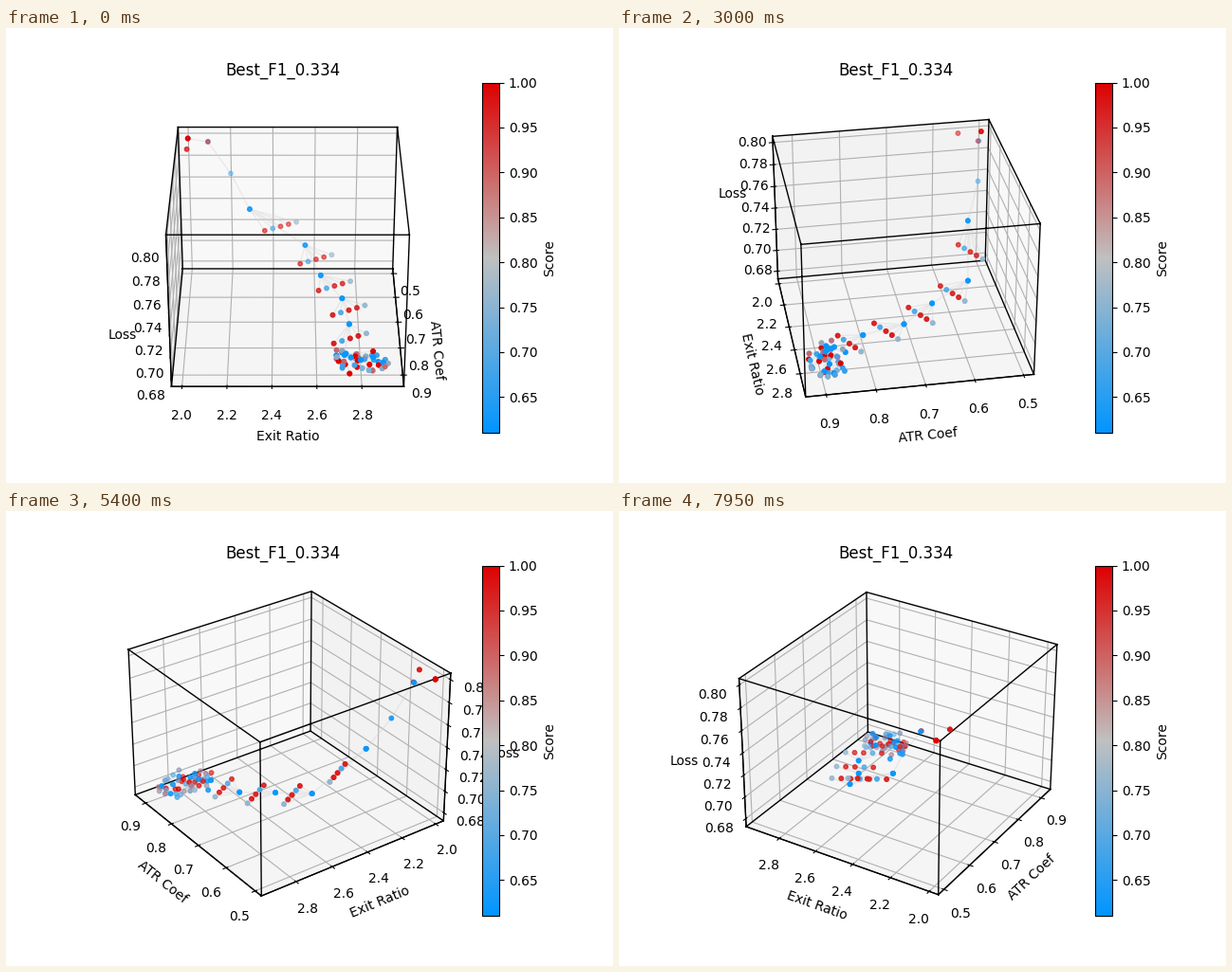
These frames come from a looping animation (640 by 480 pixels, 8000 ms). A matplotlib script:

```python
from itertools import combinations, cycle, product

import matplotlib.pyplot as plt
import numpy as np
from matplotlib.animation import FuncAnimation
from matplotlib.colors import LinearSegmentedColormap

INTERVAL = 50        # ms per animation frame
TICKS_PER_POSE = 3   # the view turns every 150 ms
TURN = 4             # degrees per pose
LIMITS = ((0.479, 0.941), (1.953, 2.987), (0.6725, 0.8055))
BLUE, RED, DULL_RED = 0.62, 1.0, 0.9

# Best points of the search: ATR coef, exit ratio, loss
START = np.array([0.5, 2.0, 0.7993])
BEST = np.array([
    [0.553, 2.290, 0.7454],
    [0.576, 2.553, 0.7167],
    [0.657, 2.625, 0.7065],
    [0.723, 2.722, 0.7003],
    [0.809, 2.750, 0.6969],
    [0.873, 2.726, 0.6843],
])


def build_data():
    """Return points, their scores, and the segments that join them."""
    points, scores, segments = [], [], []

    def add(point, *stack):
        for score in stack:
            points.append(point)
            scores.append(score)

    # The first simplex steps once along each parameter
    atr_step, ratio_step = START + (0.05, 0, 0), START + (0.016, 0.096, 0)
    halfway = (ratio_step + BEST[0]) / 2 + (-0.01, 0.008, 0)
    add(START, *[RED] * 5)
    add(atr_step, 0.97, 0.97)
    add(ratio_step, 0.97)
    add(ratio_step - (0.002, 0, 0), BLUE)
    add(halfway, 0.64)
    trail = [START, ratio_step, halfway, *BEST]
    segments += zip(trail, trail[1:])

    # Between two best points, candidates fan out across the path
    fan_scores = cycle((0.97, 0.69, 0.97, 0.97, 0.76))
    for here, following in zip(BEST, BEST[1:]):
        for offset in np.linspace(-0.06, 0.09, 5):
            candidate = (here + following) / 2 + (-0.25 * offset, offset, 0)
            score = next(fan_scores)
            add(candidate, score, score)
            segments.append((here, candidate))
    for point in BEST:
        add(point, *[BLUE] * 4)

    # Late candidates crowd around the minimum
    rng = np.random.default_rng(8)
    stacks = cycle(([BLUE] * 3, [0.68, DULL_RED], [RED] * 2,
                    [0.66, 0.74], [0.74, DULL_RED]))
    low, high = (0.84, 2.69, 0.679), (0.92, 2.94, 0.688)
    for _ in range(45):
        candidate = np.clip(rng.normal((0.885, 2.80, 0.682),
                                       (0.024, 0.062, 0.003)), low, high)
        add(candidate, *next(stacks))
        segments.append((BEST[-1], candidate))
    return np.array(points), scores, segments


def draw_segments(ax, segments, **style):
    gap = (np.nan,) * 3
    points = [p for start, end in segments for p in (start, end, gap)]
    ax.plot(*np.array(points).T, **style)


def box_edges():
    return [(a, b) for a, b in combinations(product(*LIMITS), 2)
            if sum(p != q for p, q in zip(a, b)) == 1]


fig = plt.figure(figsize=(6.4, 4.8), dpi=100)
ax = fig.add_subplot(projection="3d")
cmap = LinearSegmentedColormap.from_list(
    "score", ["#0095ff", "silver", "#dd0000"])

points, scores, segments = build_data()
draw_segments(ax, segments, color="lightgray", alpha=0.4, linewidth=1)
draw_segments(ax, box_edges(), color="black", linewidth=1)
dots = ax.scatter(*points.T, c=scores, cmap=cmap, s=10, vmin=0.61, vmax=1.0)

ax.set(xlim=LIMITS[0], ylim=LIMITS[1], zlim=LIMITS[2],
       xlabel="ATR Coef", ylabel="Exit Ratio", zlabel="Loss",
       title="Best_F1_0.334")
fig.colorbar(dots, label="Score")


def update(frame):
    # The tiny offset avoids ambiguous edge-on axis placement.
    ax.view_init(elev=30, azim=TURN * (frame // TICKS_PER_POSE) + 0.01)
    return []


anim = FuncAnimation(fig, update, frames=8000 // INTERVAL, interval=INTERVAL,
                     init_func=lambda: update(0), repeat=True, repeat_delay=0)
plt.show()
```
